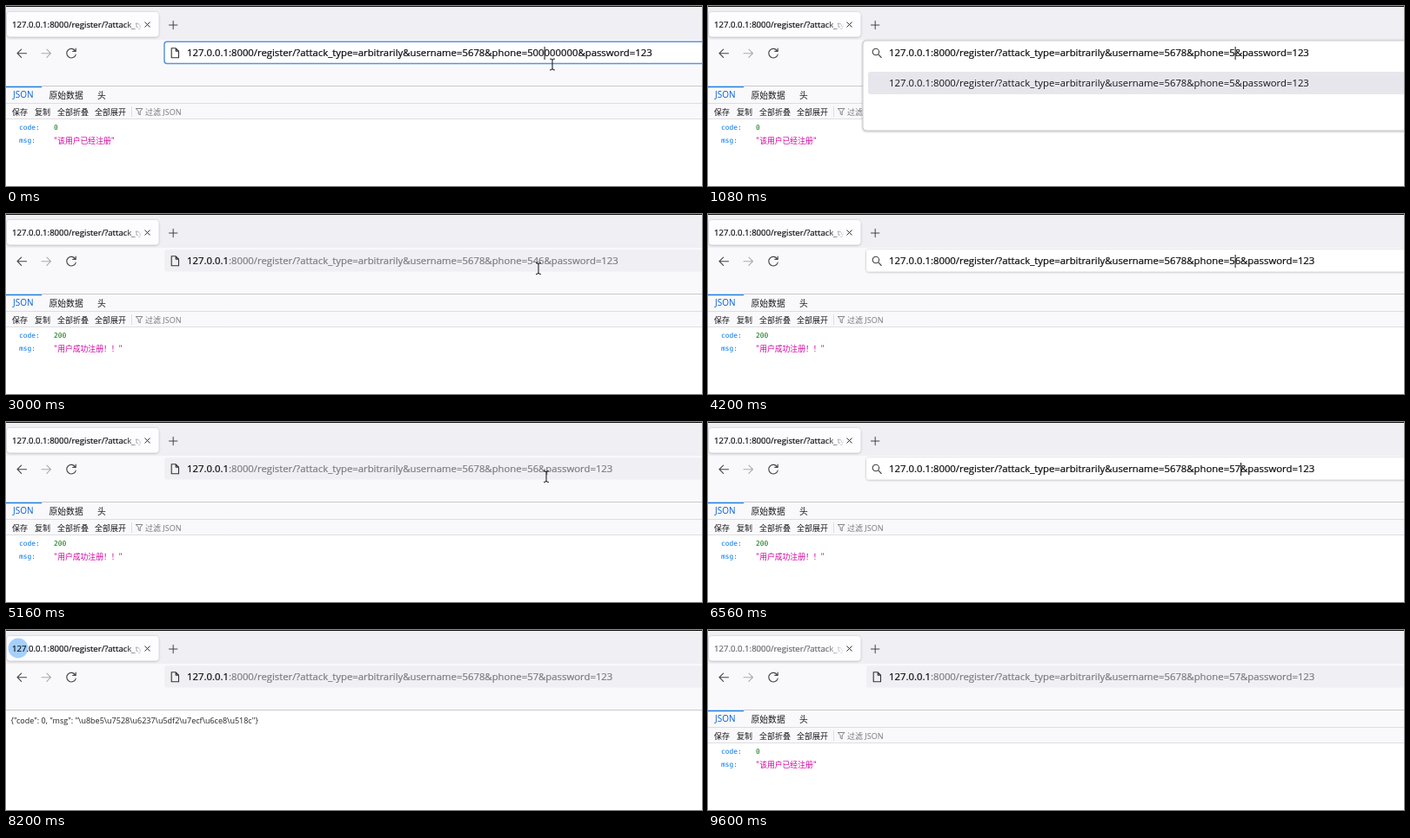
An HTML page for the animation above (9800 ms loop, 800 px wide and 208 px high).

```html
<!DOCTYPE html>
<html lang="zh">
<head>
<meta charset="utf-8">
<title>Register request</title>
<style>
  html, body { margin: 0; width: 100%; height: 100%; overflow: hidden; background: #fff; }
  svg { display: block; font-family: "Open Sans", "Noto Sans CJK SC", "Noto Sans CJK", sans-serif; }
  .line { fill: none; stroke-linecap: round; stroke-linejoin: round; }
  .firm { stroke-width: .22; }
  .cjk { font-family: "Noto Sans CJK SC", "Noto Sans CJK", sans-serif; font-size: 9px; fill: #18181c; }
  .tabs { font-size: 9.8px; }
  .mono { font: 7.9px "DejaVu Sans Mono", monospace; }
</style>
</head>
<body>
<svg id="stage" width="800" height="208" viewBox="0 0 800 208">
  <defs>
    <linearGradient id="fade" gradientUnits="userSpaceOnUse" x1="134" x2="157" y1="0" y2="0">
      <stop stop-color="currentColor"/>
      <stop offset="1" stop-color="currentColor" stop-opacity="0"/>
    </linearGradient>
    <clipPath id="tabClip"><rect x="1" y="7" width="174.5" height="28.5" rx="4"/></clipPath>
    <filter id="soft" x="-5%" y="-20%" width="110%" height="150%">
      <feDropShadow dx="0" dy="0.5" stdDeviation="1.2" flood-opacity=".35"/>
    </filter>
  </defs>

  <!-- tab strip -->
  <rect width="800" height="40" fill="#f0eff4"/>
  <rect width="800" height="1" fill="#111"/>
  <rect x="1" y="7" width="174.5" height="28.5" rx="4" fill="#fdfcff" filter="url(#soft)"/>
  <g clip-path="url(#tabClip)"><circle id="burst" cx="14" cy="21" fill="#0a84ff"/></g>
  <text class="firm" x="7" y="24.8" font-size="9.6" fill="url(#fade)" stroke="url(#fade)">127.0.0.1:8000/register/?attack_type</text>
  <path class="line" stroke="#333" d="M159.8 18.8l5.4 5.4m0-5.4l-5.4 5.4"/>
  <path class="line" stroke="#444" d="M187.5 22h9.4m-4.7-4.7v9.4"/>

  <!-- toolbar -->
  <rect y="39" width="800" height="54" fill="#f9f9fc"/>
  <path class="line" stroke="#444" stroke-width="1.1" d="M23.5 54.7H13m4.6-4.6L13 54.7l4.6 4.6"/>
  <path class="line" stroke="#aaa" stroke-width="1.1" d="M41 54.7h10.5m-4.6-4.6l4.6 4.6-4.6 4.6"/>
  <path class="line" stroke="#444" stroke-width="1.1" d="M79.6 51.9a5.3 5.3 0 1 0 .6 4.2M80.2 49v3.4h-3.4"/>

  <!-- page -->
  <rect y="93" width="800" height="115" fill="#fff"/>
  <text id="raw" x="5.5" y="107.9" font-size="9" fill="#222"></text>
  <g id="json">
    <rect y="93" width="800" height="37" fill="#f9f9fb"/>
    <path d="M0 112.5h800M0 130.5h800M144.5 116v12" stroke="#dedee2"/>
    <rect y="92.6" width="41" height="1.6" fill="#0a84ff"/>
    <text x="8" y="106.4" font-size="10" fill="#0060d0">JSON</text>
    <g class="cjk">
      <g class="tabs">
        <text x="49.5" y="106.5">原始数据</text>
        <text x="105" y="106.5">头</text>
      </g>
      <text x="7" y="125.5">保存</text>
      <text x="33" y="125.5">复制</text>
      <text x="59" y="125.5">全部折叠</text>
      <text x="102" y="125.5">全部展开</text>
    </g>
    <text x="160" y="125.5" font-size="9" fill="#77777c">过滤 JSON</text>
    <path class="line" stroke="#77777c" stroke-width=".9" d="M149.5 118.5h7.4l-2.7 3.4v4l-2-1.2v-2.8z"/>
    <g class="mono">
      <text x="15" y="143" fill="#0074e8">code:</text>
      <text x="15" y="158.4" fill="#0074e8">msg:</text>
      <text id="code" x="55" y="143" fill="#047000"></text>
    </g>
    <text id="msg" class="cjk" x="55" y="159.2" style="font-size:8.8px;fill:#d0009e"></text>
  </g>
  <rect y="92" width="800" height="1" fill="#cbcbd0"/>

  <!-- address field -->
  <rect id="field" x="182" y="41.2" width="640" height="25.3" rx="3"/>
  <g id="panel">
    <rect x="178" y="40" width="640" height="104" rx="4" fill="#fff" stroke="#c8c8ce" filter="url(#soft)"/>
    <rect x="184" y="76" width="640" height="26" rx="3" fill="#e6e6ec"/>
    <text id="hint" x="208" y="93" font-size="11.34" fill="#15141a"></text>
  </g>
  <path id="pageIcon" class="line" stroke="#333" stroke-width="1.1" d="M190.2 48.8h5l3.3 3.3v7.7h-8.3zM195.2 48.8v3.3h3.3"/>
  <path id="searchIcon" class="line" stroke="#444" stroke-width="1.1" d="M196.6 53a3.7 3.7 0 1 1-7.4 0a3.7 3.7 0 1 1 7.4 0M195.6 55.7l3.6 3.8"/>
  <rect id="mark" y="47" height="15" fill="#0078d7"/>
  <text class="firm" x="208" y="58.2" font-size="11.34"><tspan id="a"></tspan><tspan id="b"></tspan><tspan id="c"></tspan></text>
  <path id="mouse" class="line" stroke="#111" d="M-2.5-6.5Q0-6.5 0-5Q0-6.5 2.5-6.5M0-5V5M-2.5 6.5Q0 6.5 0 5Q0 6.5 2.5 6.5"/>
</svg>
<script>
const LOOP = 9800, BURST = 375;
const HOST = '127.0.0.1';
const HEAD = HOST + ':8000/register/?attack_type=arbitrarily&username=5678&phone=';
const TAIL = '&password=123';
const MESSAGES = { 0: '该用户已经注册', 200: '用户成功注册！！' };

const $ = id => document.getElementById(id);
const show = (id, on) => $(id).style.display = on ? '' : 'none';
const set = (id, attrs) => { for (const k in attrs) $(id).setAttribute(k, attrs[k]); };
const escaped = s => s.replace(/./g, ch => '\\u' + ch.charCodeAt(0).toString(16));

// Each step changes part of the state from its time on.
const type = (t, phone, at = phone.length) =>
  [t, { phone, at, select: '', open: true, typed: true }];
const click = (t, at) => [
  [t, { select: 'all', ring: true, dark: true }],
  [t + 200, { select: '', caret: true, at }]];
const enter = t => [t, { ring: false, open: false }];
const load = (t, code) => [
  [t, { code, raw: true, caret: false, typed: false, loaded: t }],
  [t + 280, { raw: false, dark: false }]];

const steps = [
  [0, { phone: '500000000', at: 3, code: 0, ring: true, dark: true, caret: true, loaded: -LOOP }],
  [40, { select: 'all' }],
  [280, { select: 'phone' }],
  type(1080, '5'), type(1160, '54'), type(1240, '546'),
  enter(1480), ...load(1740, 200),
  ...click(3160, 2), type(3720, '56', 1),
  enter(4200), ...load(4300, 200),
  ...click(5240, 2), type(5800, '5'), type(5880, '57'),
  enter(6400), ...load(6700, 200),
  ...load(7420, 0), ...load(8180, 0)
];

// Pointer: visible from/to, moving from/to, start and end point.
const pointer = [
  [0, 1080, 0, 1, 628, 67.5, 628, 67.5],
  [2600, 3720, 2720, 3000, 627, 68, 612, 63],
  [4880, 5800, 5000, 5160, 624, 65, 621, 63]
];

function splitUrl(s) {
  const url = HEAD + s.phone + TAIL, start = HEAD.length;
  let from = start + s.at, to = from;
  if (!s.dark) from = to = HOST.length;
  else if (s.select === 'all') [from, to] = [0, url.length];
  else if (s.select === 'phone') [from, to] = [start, start + s.phone.length];
  return [url.slice(0, from), url.slice(from, to), url.slice(to)];
}

function drawField(s) {
  const parts = splitUrl(s), fills = ['#0c0c10', '#fff', s.dark ? '#0c0c10' : '#7c7c82'];
  ['a', 'b', 'c'].forEach((id, i) => {
    $(id).textContent = parts[i];
    set(id, { fill: fills[i], stroke: fills[i] });
  });
  const width = id => $(id).textContent ? $(id).getComputedTextLength() : 0;
  set('mark', { x: 208 + width('a'), width: width('b') || 1, fill: parts[1] ? '#0078d7' : '#111' });
  show('mark', s.dark && (s.caret || s.select));
  set('field', {
    fill: s.dark ? '#fff' : '#f0f0f4',
    stroke: s.ring ? '#5c94da' : 'none',
    'stroke-width': 1.5,
    filter: s.dark && !s.ring ? 'url(#soft)' : 'none'
  });
  $('hint').textContent = parts.join('');
  show('panel', s.open);
  show('pageIcon', !s.typed);
  show('searchIcon', s.typed);
}

function drawPage(s) {
  const msg = MESSAGES[s.code];
  $('raw').textContent = `{"code": ${s.code}, "msg": "${escaped(msg)}"}`;
  $('code').textContent = s.code;
  $('msg').textContent = `"${msg}"`;
  show('raw', s.raw);
  show('json', !s.raw);
}

function drawBurst(age) {
  const x = age / BURST, on = x >= 0 && x < 1;
  show('burst', on);
  if (!on) return;
  let lo = 0, hi = 1;
  for (let i = 0; i < 20; i++) { // solve cubic-bezier(0, 0, .58, 1)
    const u = (lo + hi) / 2;
    if (1.74 * u * u * (1 - u) + u ** 3 < x) lo = u; else hi = u;
  }
  const ease = lo * lo * (3 - 2 * lo);
  set('burst', { r: 2.5 * (1 + 39 * ease), opacity: 0.4 * (1 - ease) });
}

function drawPointer(t) {
  const p = pointer.find(([from, to]) => t >= from && t < to);
  show('mouse', p);
  if (!p) return;
  const [, , start, end, x0, y0, x1, y1] = p;
  const k = Math.min(1, Math.max(0, (t - start) / (end - start)));
  set('mouse', { transform: `translate(${x0 + (x1 - x0) * k} ${y0 + (y1 - y0) * k})` });
}

function draw(t) {
  const s = Object.assign({}, ...steps.filter(([at]) => at <= t).map(([, change]) => change));
  $('stage').style.color = t < 9600 ? '#111' : '#6a6a6e';
  drawField(s);
  drawPage(s);
  drawBurst(t - s.loaded);
  drawPointer(t);
}

const begin = performance.now();
function tick() {
  draw((performance.now() - begin) % LOOP);
  requestAnimationFrame(tick);
}
tick();
</script>
</body>
</html>
```
